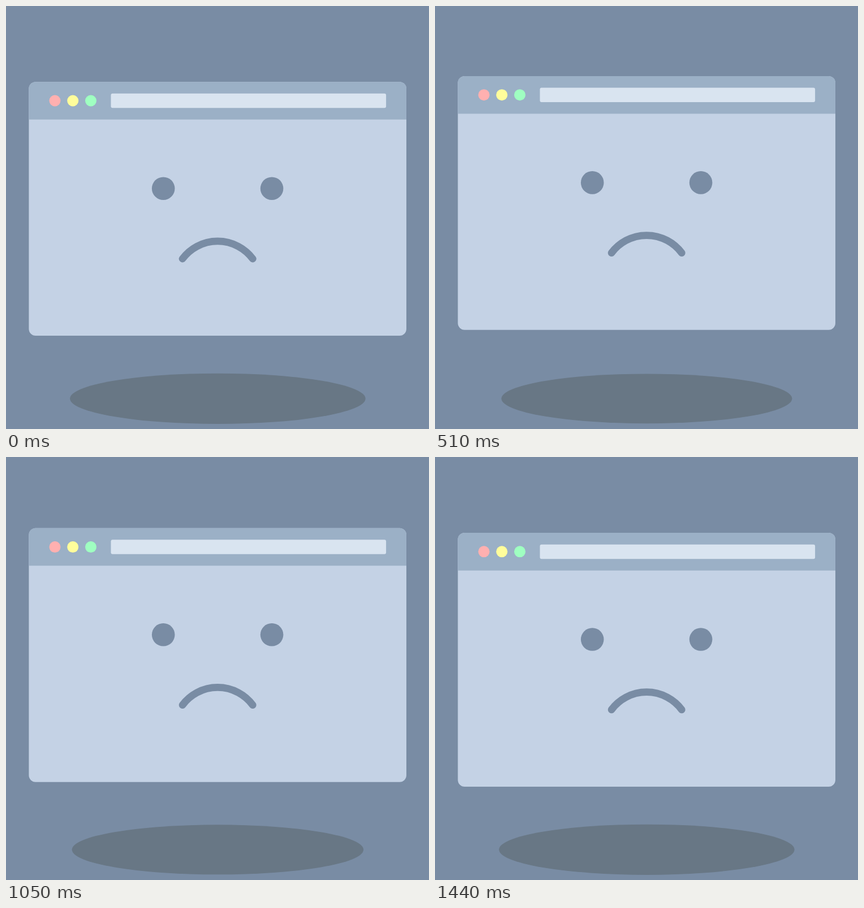
An HTML page for the animation above (1470 ms loop, 748 px wide and 748 px high).

```html
<!DOCTYPE html>
<html lang="en">
<head>
<meta charset="utf-8">
<title>Sad browser window</title>
<style>
  html, body { margin: 0; height: 100%; overflow: hidden; background: #798ca4; }
  svg { display: block; width: 100%; height: 100%; }
</style>
</head>
<body>
<svg viewBox="0 0 748 748">
  <ellipse id="shadow" cx="374.4" cy="694.3" rx="261.3" ry="44.6" fill="#687785"/>
  <g id="browser">
    <rect x="40.4" y="134.2" width="667.6" height="448.9" rx="12" fill="#c4d2e5"/>
    <path d="M40.4 200.8V146.2a12 12 0 0 1 12-12H696a12 12 0 0 1 12 12V200.8Z" fill="#9bb0c6"/>
    <circle cx="86.5" cy="167.5" r="10" fill="#ffb0b0"/>
    <circle cx="118.2" cy="167.5" r="10" fill="#fffd9b"/>
    <circle cx="150" cy="167.5" r="10" fill="#9fffc1"/>
    <rect x="185.5" y="154.8" width="486.6" height="25.5" rx="3" fill="#d9e4f0"/>
    <g fill="#798ca4">
      <circle cx="278.2" cy="322.7" r="20.3"/>
      <circle cx="470.1" cy="322.7" r="20.3"/>
    </g>
    <path d="M312.1 447A77.5 77.5 0 0 1 436.3 447" fill="none" stroke="#798ca4" stroke-width="12.8" stroke-linecap="round"/>
  </g>
</svg>
<script>
  const LOOP = 1470, STEP = 30, PERIOD = 1500, PHASE = 8, RISE = 13.2;
  const browser = document.getElementById('browser');
  const shadow = document.getElementById('shadow');
  const start = performance.now();

  function draw() {
    const elapsed = (performance.now() - start) % LOOP;
    const time = Math.floor(elapsed / STEP) * STEP + PHASE;
    const lift = (1 - Math.cos(time / PERIOD * 2 * Math.PI)) / 2;
    const scale = 1 - 0.021 * lift;
    browser.setAttribute('transform', `translate(0 ${-RISE * lift})`);
    shadow.setAttribute('rx', 261.3 * scale);
    shadow.setAttribute('ry', 44.6 * scale);
    requestAnimationFrame(draw);
  }
  draw();
</script>
</body>
</html>
```
